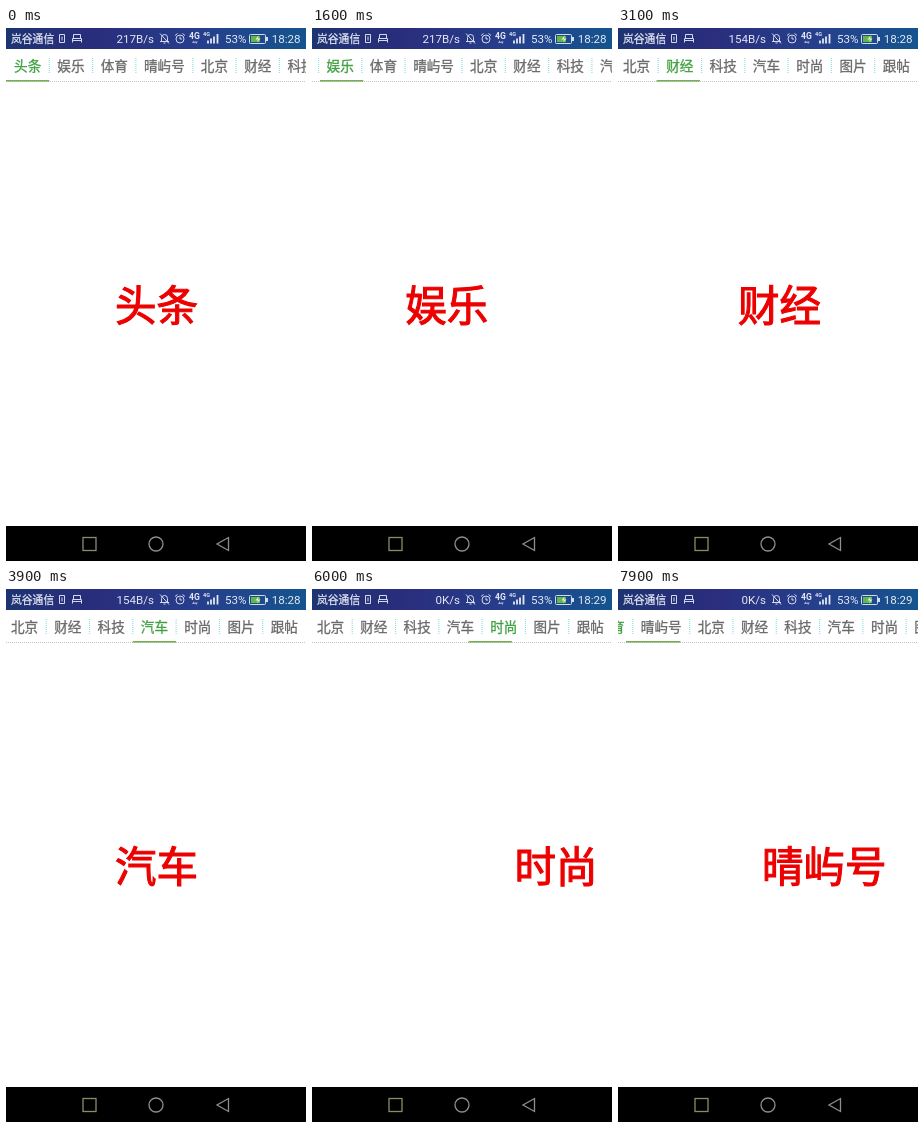
These frames come from a looping animation (300 px wide and 533 px high, 8000 ms). An HTML page:

```html
<!DOCTYPE html>
<html lang="zh-CN">
<head>
<meta charset="utf-8">
<title>Tab pager</title>
<style>
  html, body { margin: 0; width: 100%; height: 100%; overflow: hidden; background: #fff; }
  svg { display: block; width: 100%; height: 100%; }
  text { font-family: "Noto Sans CJK SC", "Noto Sans CJK", "Noto Sans", sans-serif; }
  .tab { font-size: 13.6px; fill: #6a6a6a; stroke: #6a6a6a; stroke-width: .3; text-anchor: middle; }
  .tab.on { fill: #3fa03f; stroke: #3fa03f; }
  .page { font-size: 41.5px; fill: #ec0000; stroke: #ec0000; stroke-width: 1.1; text-anchor: middle; }
  .status text { fill: #e4e7f4; font-size: 11.6px; font-family: Roboto, "Noto Sans CJK SC", sans-serif; }
  .status .carrier { font-size: 10.8px; stroke: #e4e7f4; stroke-width: .25; }
  .line { fill: none; stroke: #d4d9ec; stroke-width: 1; }
  .nav { fill: none; stroke: #8e8e8e; stroke-width: 1.3; }
</style>
</head>
<body>
<svg viewBox="0 0 300 533">
  <defs>
    <linearGradient id="bar">
      <stop offset="0" stop-color="#1e3472"/>
      <stop offset=".3" stop-color="#2a2d7c"/>
      <stop offset=".65" stop-color="#263f8c"/>
      <stop offset="1" stop-color="#14548e"/>
    </linearGradient>
  </defs>
  <rect width="300" height="533" fill="#fff"/>
  <g id="pages"></g>
  <g id="strip"></g>
  <path d="M0 53.5H300" stroke="#c4c4c4" stroke-dasharray="1 1"/>
  <rect id="mark" y="52" height="1.6" fill="#78ad58"/>

  <g class="status">
    <rect width="300" height="21" fill="url(#bar)"/>
    <text class="carrier" x="5" y="15">岚谷通信</text>
    <path class="line" d="M53.5 6.500h5v8h-5zM56 8.500v4M67.500 10V6.500h7V10M66.500 14.500v-4h9v4M66.500 12.500h9"/>
    <text id="speed" x="148" y="15" text-anchor="end"></text>
    <path class="line" d="M154 13.500h9M155.500 13V9.500a3 3 0 0 1 6 0V13M157.500 15h2M154 5.500l9 10"/>
    <circle class="line" cx="174" cy="11" r="4"/>
    <path class="line" d="M174 8.500V11h2M169 7.500l2.500-2M179 7.500l-2.500-2"/>
    <text x="183" y="11.2" style="font-size:8.6px;font-weight:700">4G</text>
    <path d="M186 15l1.6-2.5 1.6 2.5zM188.6 13.5h3.2l-1.6 2.5z" fill="#aab0d0"/>
    <text x="197" y="8" style="font-size:5.6px;font-weight:700">4G</text>
    <path d="M202 15.500v-3M205 15.500v-5M208 15.500v-7M211.500 15.500v-9.500" stroke="#e4e7f4" stroke-width="1.8"/>
    <text x="219" y="15">53%</text>
    <rect class="line" x="243.500" y="6.500" width="16" height="9" rx="1"/>
    <rect x="245" y="8" width="9" height="6" fill="#62b848"/>
    <path d="M260 9h2v4h-2z" fill="#d4d9ec"/>
    <path d="M252.500 7.500l-3 4h2.500l-1 3 3.500-4h-2.500z" fill="#e8f0e0"/>
    <text id="clock" x="294.500" y="15" text-anchor="end"></text>
  </g>

  <rect y="498" width="300" height="35" fill="#000"/>
  <rect class="nav" x="77" y="509.500" width="13" height="13" style="stroke:#8c8b66"/>
  <circle class="nav" cx="150" cy="516" r="7"/>
  <path class="nav" d="M222.500 509.500v13l-11.500-6.500z"/>
</svg>
<script>
const LOOP = 8000, STEP = 100, W = 300, INSET = 8, LAG = 10;
const names = ['头条', '娱乐', '体育', '晴屿号', '北京', '财经', '科技', '汽车', '时尚', '图片', '跟帖'];
// Each swipe: start, duration, page reached, share of the way at release
const swipes = [
  [1000, 450, 1], [1550, 360, 2], [1980, 380, 3], [2410, 375, 4], [2790, 350, 5],
  [3160, 330, 6], [3500, 380, 7], [4000, 400, 8], [4420, 380, 9], [4820, 380, 10],
  [5210, 320, 9], [5540, 320, 8], [5870, 350, 7], [6230, 320, 6], [6560, 350, 5],
  [6920, 381, 4], [7330, 390, 3], [7790, 400, 2, .2]
];

const $ = id => document.getElementById(id);
function add(parent, tag, attrs, text = '') {
  const el = document.createElementNS('http://www.w3.org/2000/svg', tag);
  for (const k in attrs) el.setAttribute(k, attrs[k]);
  el.textContent = text;
  parent.append(el);
  return el;
}

const edges = [0];
const tabs = names.map((name, i) => {
  const left = edges[i], width = 16.1 + 13.6 * name.length;
  edges.push(left + width);
  if (i < names.length - 1)
    add($('strip'), 'path', { d: `M${left + width} 30v16`, stroke: '#8fdfea', 'stroke-width': 1.2, 'stroke-dasharray': '1 1' });
  add($('pages'), 'text', { class: 'page', x: W / 2 + i * W + .6, y: 293.4 }, name);
  return add($('strip'), 'text', { class: 'tab', x: left + width / 2, y: 43 }, name);
});
const maxScroll = edges[names.length] - W;

function pager(t) {
  let pos = 0, selected = 0;
  for (const [start, dur, to, release = .4] of swipes) {
    if (t < start) break;
    const u = Math.min(1, (t - start) / dur), e = u * u * (3 - 2 * u);
    pos += (to - pos) * e;
    if (u > release) selected = to;
    if (u < 1) break;
  }
  return { pos, selected };
}

// Position along a list of tab edges for a fractional page
function along(list, pos) {
  const i = Math.floor(pos), next = list[Math.min(i + 1, list.length - 1)];
  return list[i] + (next - list[i]) * (pos - i);
}
const lefts = edges.slice(0, -1), rights = edges.slice(1);
const scrollAt = pos => Math.max(0, Math.min(maxScroll, along(lefts, pos) - INSET));
const shift = (id, x) => $(id).setAttribute('transform', `translate(${-x} 0)`);

function draw(t) {
  const { pos, selected } = pager(t);
  const left = along(lefts, pos);
  shift('pages', pos * W);
  shift('strip', scrollAt(pager(t - LAG).pos));
  $('mark').setAttribute('x', left - scrollAt(pos));
  $('mark').setAttribute('width', along(rights, pos) - left);
  tabs.forEach((tab, i) => tab.classList.toggle('on', i === selected));
  $('speed').textContent = t < 2000 ? '217B/s' : t < 5000 ? '154B/s' : '0K/s';
  $('clock').textContent = t < 5000 ? '18:28' : '18:29';
}

const begin = performance.now();
function frame() {
  const t = (performance.now() - begin) % LOOP;
  draw(Math.floor(t / STEP) * STEP);
  requestAnimationFrame(frame);
}
frame();
</script>
</body>
</html>
```
